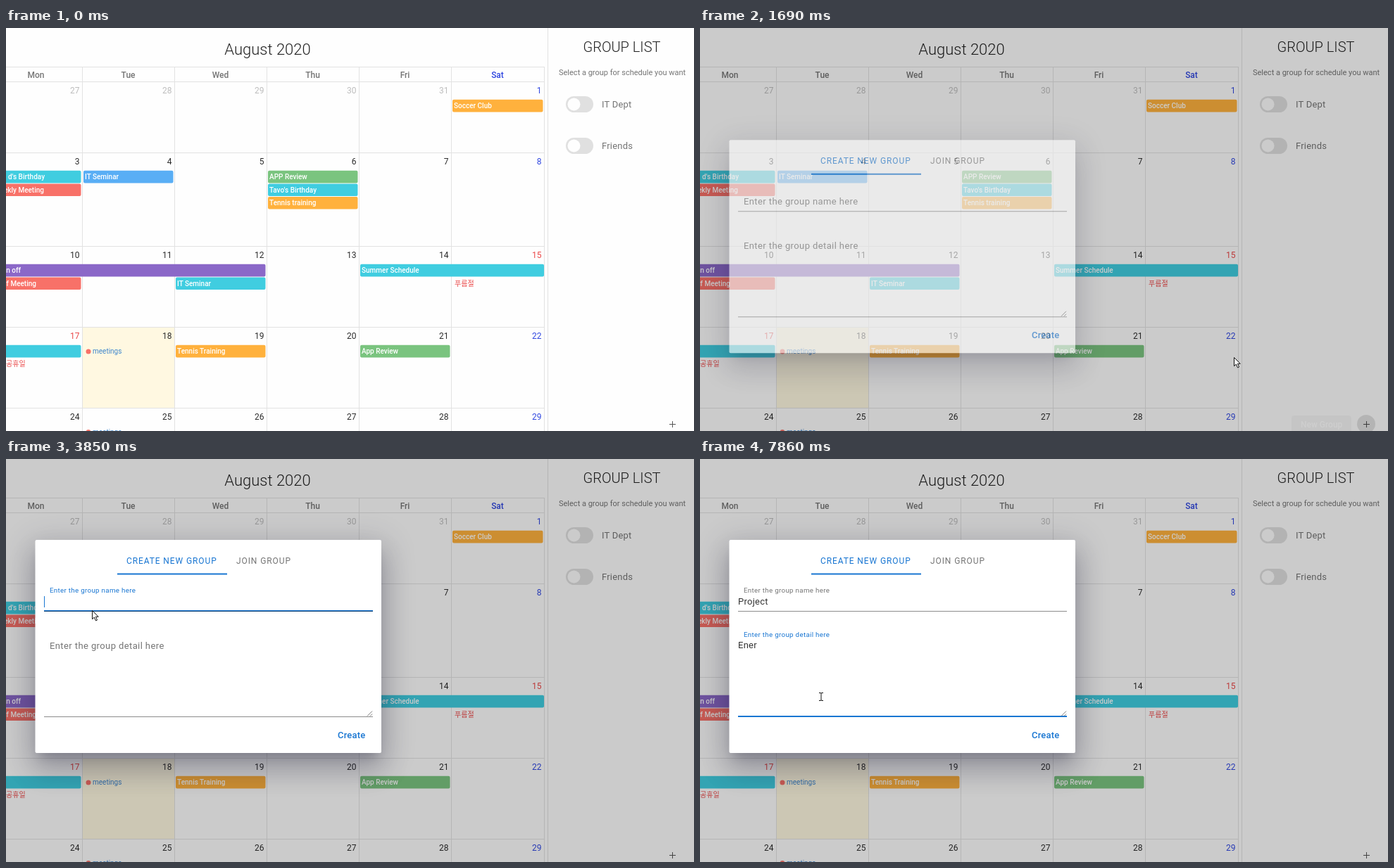
An HTML page for the animation above (8000 ms loop, 977 px wide and 573 px high).

```html
<!DOCTYPE html>
<html lang="en">
<head>
<meta charset="utf-8">
<title>Group calendar</title>
<style>
  html, body { margin: 0; width: 100%; height: 100%; overflow: hidden; background: #fefefe; }
  svg { display: block; width: 977px; height: 573px; font-family: Roboto, "Noto Sans CJK KR", "Noto Sans CJK", sans-serif; }
  .title { font-weight: 300; fill: #222; text-anchor: middle; }
  .day { font-size: 12px; font-weight: 500; text-anchor: middle; }
  .date { font-size: 12px; text-anchor: end; }
  .event { font-size: 10px; font-weight: 500; fill: #fff; }
  .small { font-size: 10px; }
  .group { font-size: 13px; letter-spacing: .2px; fill: #757575; }
  .tab { font-size: 12px; letter-spacing: .9px; }
  .label { font-size: 13px; letter-spacing: .4px; }
  .typed { font-size: 13px; letter-spacing: .25px; fill: #333; }
  .button { font-size: 13px; font-weight: 500; letter-spacing: .2px; }
</style>
</head>
<body>
<svg id="stage" viewBox="0 0 977 573"></svg>
<script>
const LOOP = 8000;
const BLUE = '#1976d2', GREY = '#757575', SAT = '#2f46e0', HOLIDAY = '#ea4848';
const TEAL = '#40cde0', RED = '#f87168', SKY = '#59aef5', GREEN = '#7ac47f', ORANGE = '#ffb13d', PURPLE = '#8b68c8';
const columns = [-23, 108, 239, 370, 501, 632, 764];
const rows = [76, 177, 310, 425, 540];

const rect = (x, y, w, h, fill, extra = '') =>
  `<rect x="${x}" y="${y}" width="${w}" height="${h}" fill="${fill}" ${extra}/>`;
const text = (x, y, cls, str, extra = '') => `<text x="${x}" y="${y}" class="${cls}" ${extra}>${str}</text>`;
const color = c => `fill="${c}"`;

function calendar() {
  const line = '#e2e2e2';
  let out = rect(108.5, 426, 131, 114, '#fff8e1');
  for (const y of [55, ...rows]) out += rect(0, y, 764, 1, line);
  for (const x of columns.slice(1)) out += rect(x, 55, 1, 518, line);
  out += rect(769, 0, 1, 573, line);
  out += text(371.5, 37.5, 'title', 'August 2020', 'font-size="22"');

  ['Mon', 'Tue', 'Wed', 'Thu', 'Fri', 'Sat'].forEach((name, c) =>
    out += text((columns[c] + columns[c + 1]) / 2, 70.5, 'day', name, color(c === 5 ? SAT : GREY)));

  rows.forEach((top, r) => {
    for (let c = 0; c < 6; c++) {
      const n = 27 + r * 7 + c;
      const date = n > 31 ? n - 31 : n;
      const tint = date === 15 || date === 17 ? HOLIDAY : c === 5 ? SAT : r === 0 ? '#bdbdbd' : '#2b2b2b';
      out += text(columns[c + 1] - 3.5, top + 16.5, 'date', date, color(tint));
    }
  });

  const event = (r, slot, from, to, fill, name, end) => {
    const x = columns[from] + 2, y = rows[r] + 25.8 + slot * 18.6;
    const w = to === 6 && from === 4 ? 261 : columns[to] - 1.5 - x;
    out += rect(x, y, w, 17.6, fill, 'rx="2"');
    out += end ? text(end, y + 12.3, 'event', name, 'text-anchor="end"') : text(x + 2, y + 12.3, 'event', name);
  };
  event(0, 0, 5, 6, ORANGE, 'Soccer Club');
  event(1, 0, 0, 1, TEAL, "d's Birthday", 55);
  event(1, 1, 0, 1, RED, 'Weekly Meeting', 54);
  event(1, 0, 1, 2, SKY, 'IT Seminar');
  event(1, 0, 3, 4, GREEN, 'APP Review');
  event(1, 1, 3, 4, TEAL, "Tavo's Birthday");
  event(1, 2, 3, 4, ORANGE, 'Tennis training');
  event(2, 0, 0, 3, PURPLE, 'n off', 21);
  event(2, 1, 0, 1, RED, 'f Meeting', 43);
  event(2, 1, 2, 3, TEAL, 'IT Seminar');
  event(2, 0, 4, 6, TEAL, 'Summer Schedule');
  event(3, 0, 0, 1, TEAL, '');
  event(3, 0, 2, 3, ORANGE, 'Tennis Training');
  event(3, 0, 4, 5, GREEN, 'App Review');

  out += text(637, 367, 'small', '푸름절', color(HOLIDAY));
  out += text(0, 481, 'small', '공휴일', color(HOLIDAY));
  for (const y of [460, 574.5])
    out += `<circle cx="117" cy="${y}" r="3.5" fill="${RED}"/>` + text(123, y + 3, 'small', 'meetings', color('#3f86cc'));
  return out;
}

function sidebar() {
  let out = text(874.5, 33.5, 'title', 'GROUP LIST', 'font-size="20"');
  out += text(785, 66.5, '', 'Select a group for schedule you want', 'font-size="11" fill="#757575"');
  ['IT Dept', 'Friends'].forEach((name, i) => {
    const y = 108.5 + i * 59;
    out += rect(795, y - 11.5, 39, 23, '#e0e0e0', 'rx="11.5"');
    out += `<circle cx="806.5" cy="${y}" r="9" fill="#fefefe"/>` + text(846, y + 4.5, 'group', name);
  });
  return out + '<path d="M942 563.5h9M946.5 559v9" stroke="#555" fill="none"/>';
}

function dialog() {
  const shadow = (dy, blur, spread, alpha) =>
    rect(41.5 - spread, 115 + dy - spread, 491.5 + 2 * spread, 303 + 2 * spread, '#14142e',
      `opacity="${alpha}" style="filter:blur(${blur / 2}px)"`);
  return shadow(11, 15, -7, .22) + shadow(24, 38, 3, .18) + shadow(9, 46, 8, .16)
    + rect(41.5, 115, 491.5, 303, '#fff', 'rx="2"')
    + text(171, 149, 'tab', 'CREATE NEW GROUP', color(BLUE))
    + text(327, 149, 'tab', 'JOIN GROUP', color(GREY))
    + rect(158, 162.5, 156, 2, BLUE)
    + rect(54, 216, 467, 1, '#8c8c8c') + rect(54, 366, 467, 1, '#8c8c8c')
    + rect(54, 216, 467, 1, '#1d1d1d', 'id="hover"')
    + rect(54, 215, 467, 1.5, BLUE, 'id="nameLine"') + rect(54, 365, 467, 2, BLUE, 'id="detailLine"')
    + '<path d="M513 365.5l7-7M517 365.5l3-3" stroke="#777" fill="none"/>'
    + text(0, 0, 'label', 'Enter the group name here', 'id="nameLabel"')
    + text(0, 0, 'label', 'Enter the group detail here', 'id="detailLabel"')
    + text(54, 207, 'typed', '', 'id="nameText"') + text(54, 268.5, 'typed', '', 'id="detailText"')
    + rect(54, 195, 1, 16, BLUE, 'id="nameCaret"') + rect(54, 256, 1, 16, '#333', 'id="detailCaret"')
    + text(471, 397, 'button', 'Create', color(BLUE));
}

const stage = document.getElementById('stage');
stage.innerHTML = rect(0, 0, 977, 573, '#fefefe') + calendar() + sidebar()
  + '<circle id="ripple" fill="#000"/>'
  + rect(933.5, 550.5, 26, 30, 'none', 'id="ring" rx="2" stroke="#111" stroke-width="2"')
  + rect(0, 0, 977, 573, '#000', 'id="backdrop"')
  + `<g id="tooltip">${rect(840, 551, 85, 28, '#7c7c7c', 'rx="4"')}${text(853, 568, '', 'New Group', 'font-size="12" font-weight="500" fill="#fff"')}</g>`
  + `<g id="dialog">${dialog()}</g>`
  + '<path id="arrow" d="M.5 .5v12.2l2.8-2.6 2.2 4.8 2-.9-2.1-4.7h3.8z" fill="#fff" stroke="#111"/>'
  + '<path id="beam" d="M-3 -5.5h2.2l.8.7.8-.7h2.2M0 -5v10M-3 5.5h2.2l.8-.7.8.7h2.2" fill="none" stroke="#111"/>';

const el = {};
for (const node of stage.querySelectorAll('[id]')) el[node.id] = node;
const set = (node, attrs) => { for (const k in attrs) node.setAttribute(k, attrs[k]); };
const show = (node, on) => set(node, { visibility: on ? 'visible' : 'hidden' });
const ramp = (t, a, b) => Math.min(1, Math.max(0, (t - a) / (b - a)));
const easeOut = p => 1 - (1 - p) ** 3;
const smooth = p => p * p * (3 - 2 * p);

const pointer = [
  [300, 494, 200], [1090, 920, 558], [1230, 936, 567], [1540, 936, 567], [1610, 892, 528],
  [1920, 102, 171], [2380, 122, 215], [6010, 122, 215], [6300, 172, 338]
];
const nameKeys = [[3390, 'p'], [3850, ''], [4080, 'P'], [4250, 'Pr'], [4630, 'Pro'], [4860, 'Proj'],
  [5170, 'Proje'], [5410, 'Projec'], [5550, 'Project']];
const detailKeys = [[6620, 'E'], [7160, 'En'], [7230, 'Ene'], [7310, 'Ener']];

function pointerAt(t) {
  const i = pointer.findIndex(k => k[0] > t);
  if (i < 0) return pointer[pointer.length - 1].slice(1);
  if (i === 0) return pointer[0].slice(1);
  const [a, b] = [pointer[i - 1], pointer[i]];
  const p = smooth(ramp(t, a[0], b[0]));
  return [a[1] + (b[1] - a[1]) * p, a[2] + (b[2] - a[2]) * p];
}

function drawField(id, t, keys, focus, blur, restY, floatY, caretOn) {
  const float = easeOut(ramp(t, focus - 10, focus + 200));
  const focused = t >= focus && t < blur;
  set(el[id + 'Label'], {
    transform: `translate(62 ${restY + (floatY - restY) * float}) scale(${1 - .247 * float})`,
    fill: focused ? BLUE : GREY
  });
  const grow = easeOut(ramp(t, focus - 10, focus + 230)) * (1 - easeOut(ramp(t, blur, blur + 200)));
  set(el[id + 'Line'], { x: 287.5 - 233.5 * grow, width: 467 * grow });
  const typed = keys.filter(k => k[0] <= t).pop();
  el[id + 'Text'].textContent = typed ? typed[1] : '';
  const width = typed && typed[1] ? el[id + 'Text'].getComputedTextLength() : 0;
  set(el[id + 'Caret'], { x: Math.round(54 + width) });
  show(el[id + 'Caret'], focused && caretOn);
}

function draw(t) {
  set(el.backdrop, { opacity: .2 * ramp(t, 1545, 1610) });
  set(el.tooltip, { opacity: ramp(t, 1230, 1310) * (1 - ramp(t, 1575, 1700)) });
  show(el.ring, t >= 1460 && t < 1580);
  const spread = ramp(t, 1480, 1600);
  set(el.ripple, {
    cx: 941 + 5 * spread, cy: 565 - 2 * spread, r: 3 + 10 * spread,
    opacity: t < 1480 ? 0 : .2 * (1 - ramp(t, 1640, 1760))
  });

  const enter = easeOut(ramp(t, 1585, 1990));
  set(el.dialog, { opacity: enter, transform: `translate(0 ${110 * (1 - enter)})` });
  show(el.hover, t >= 2380 && t < 6080);
  drawField('name', t, nameKeys, 2540, 6310, 207, 189.5, t < 3070 || t >= 3390);
  drawField('detail', t, detailKeys, 6310, LOOP, 270, 253, t < 7860);

  const [x, y] = pointerAt(t);
  const overDetail = t > 6010 && y > 254;
  const place = { transform: `translate(${Math.round(x)} ${Math.round(y)})` };
  set(el.arrow, place);
  set(el.beam, place);
  show(el.arrow, t >= 300 && !overDetail);
  show(el.beam, overDetail);
}

const start = performance.now();
function tick() {
  draw((performance.now() - start) % LOOP);
  requestAnimationFrame(tick);
}
tick();
</script>
</body>
</html>
```
